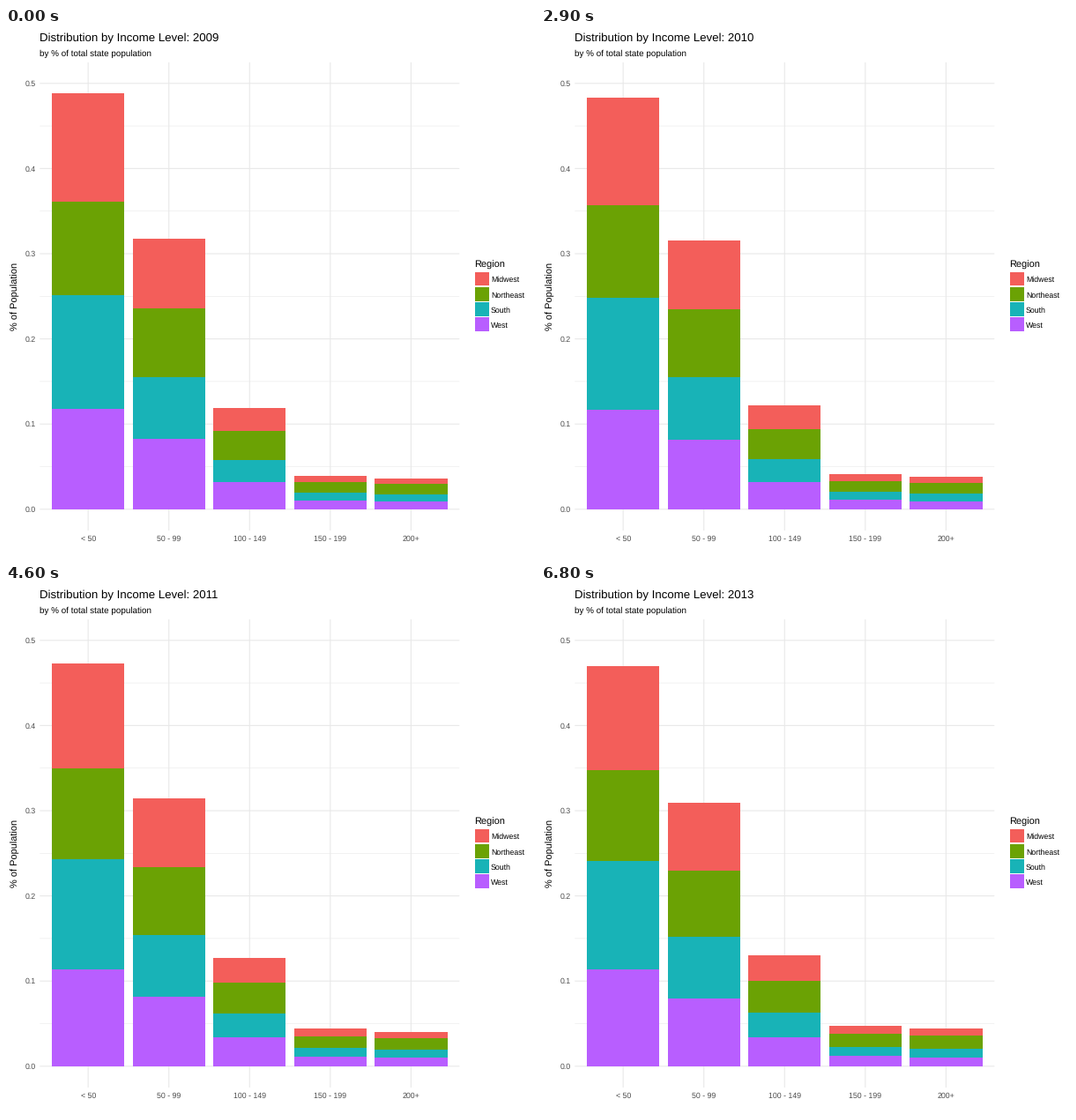
Write a matplotlib script that moves like this. It is 600 px wide and 600 px high and loops after 8 s.

```python
import matplotlib.pyplot as plt
import numpy as np
from matplotlib.animation import FuncAnimation
from matplotlib.patches import Rectangle

plt.rcParams["font.family"] = "Liberation Sans"
plt.rcParams["text.hinting"] = "none"

SIZE, DPI = 600, 100
FRAMES, INTERVAL = 80, 100
FIRST, PERIOD, TWEEN = 11, 17, 6   # transition timing, in frames
START_YEAR, SPAN = 2009, 4

LEFT, RIGHT, TOP, BOTTOM = 38.3, 514.3, 39, 570
BASE, UNIT = 545.8, 96.6           # y of zero, pixels per 0.1
ZERO = 546                         # pixel row where bars stand
X0, STEP, BAR = 93.18, 91.55, 82.4

REGIONS = {"Midwest": "#F35E5A", "Northeast": "#6BA204",
           "South": "#18B3B7", "West": "#B85EFF"}
STACK = list(REGIONS.values())[::-1]

# Each level: stacked heights at the start (West first), growth over the
# whole span, and how strongly it follows the pace of change
LEVELS = {
    "< 50": ([114, 242.6, 349, 472], 0.962, 1.2),
    "50 - 99": ([79.55, 150.45, 228, 307], 0.974, -0.5),
    "100 - 149": ([30.55, 55.6, 88.6, 115], 1.095, 0.9),
    "150 - 199": ([10, 18.55, 30.6, 38], 1.21, 0.3),
    "200+": ([8.55, 16.6, 28.6, 35], 1.217, 0.3),
}
PACE = [0, 0.275, 0.77, 0.91, 1]   # by year

fig = plt.figure(figsize=(SIZE / DPI, SIZE / DPI), dpi=DPI, facecolor="white")
ax = fig.add_axes([0, 0, 1, 1])
ax.set(xlim=(0, SIZE), ylim=(SIZE, 0))
ax.axis("off")


def label(x, y, text, px, color="black", ha="left", **kw):
    return ax.text(x, y, text, fontsize=px * 72 / DPI, color=color, ha=ha,
                   va="baseline", **kw)


def grid(xs, ys, width=1.07):
    ax.plot(xs, ys, color="#E8E8E8", lw=width * 72 / DPI, snap=False,
            solid_capstyle="butt", zorder=1)


def box(x, y, w, h, color):
    return ax.add_patch(Rectangle((x, y), w, h, fc=color, lw=0,
                                  antialiased=False, zorder=2))


def ease(u):
    return 4 * u ** 3 if u < 0.5 else 1 - 4 * (1 - u) ** 3


def elapsed(frame):
    """Years since the first one, eased between holds."""
    k, rest = divmod(frame - FIRST, PERIOD)
    return k + ease(min(rest / TWEEN, 1))


def heights(start, growth, lean, s):
    t = s / SPAN
    t += lean * (np.interp(s, range(SPAN + 1), PACE) - t)
    return np.round(np.array(start) * (1 + (growth - 1) * t))


def draw_axes():
    for i in range(5):
        y = BASE - (i + 0.5) * UNIT
        grid([LEFT, RIGHT], [y, y], 0.55)
    for i in range(6):
        y = BASE - i * UNIT
        grid([LEFT, RIGHT], [y, y])
        label(33.4, y + 3.2, f"{i / 10:.1f}", 8.8, "#4D4D4D", "right")
    for i, name in enumerate(LEVELS):
        x = X0 + i * STEP
        grid([x, x], [TOP, BOTTOM])
        label(x, 582, name, 8.8, "#4D4D4D", "center")
    label(13.3, 304, "% of Population", 11, ha="center",
          rotation=90, rotation_mode="anchor")


def draw_legend():
    label(531, 272, "Region", 11)
    for i, (name, color) in enumerate(REGIONS.items()):
        y = 276.6 + i * 17.28
        top, bottom = round(y), round(y + 15.8)
        box(532, top, 16, bottom - top, color)
        label(550, y + 11.6, name, 8.8)


def make_stack(i):
    x = X0 + i * STEP
    x1, x2 = round(x - BAR / 2), round(x + BAR / 2)
    return [box(x1, ZERO, x2 - x1, 0, c) for c in STACK]


draw_axes()
draw_legend()
title = label(38.2, 15, "", 13.2)
label(38.2, 32, "by % of total state population", 9.9)
bars = [make_stack(i) for i in range(len(LEVELS))]


def update(frame):
    s = elapsed(frame)
    for stack, level in zip(bars, LEVELS.values()):
        below = 0
        for rect, top in zip(stack, heights(*level, s)):
            rect.set_y(ZERO - top)
            rect.set_height(top - below)
            below = top
    title.set_text(f"Distribution by Income Level: {round(START_YEAR + s)}")
    return [title, *(r for stack in bars for r in stack)]


anim = FuncAnimation(fig, update, frames=FRAMES, interval=INTERVAL,
                     repeat=True, repeat_delay=0, blit=False)
plt.show()
```
